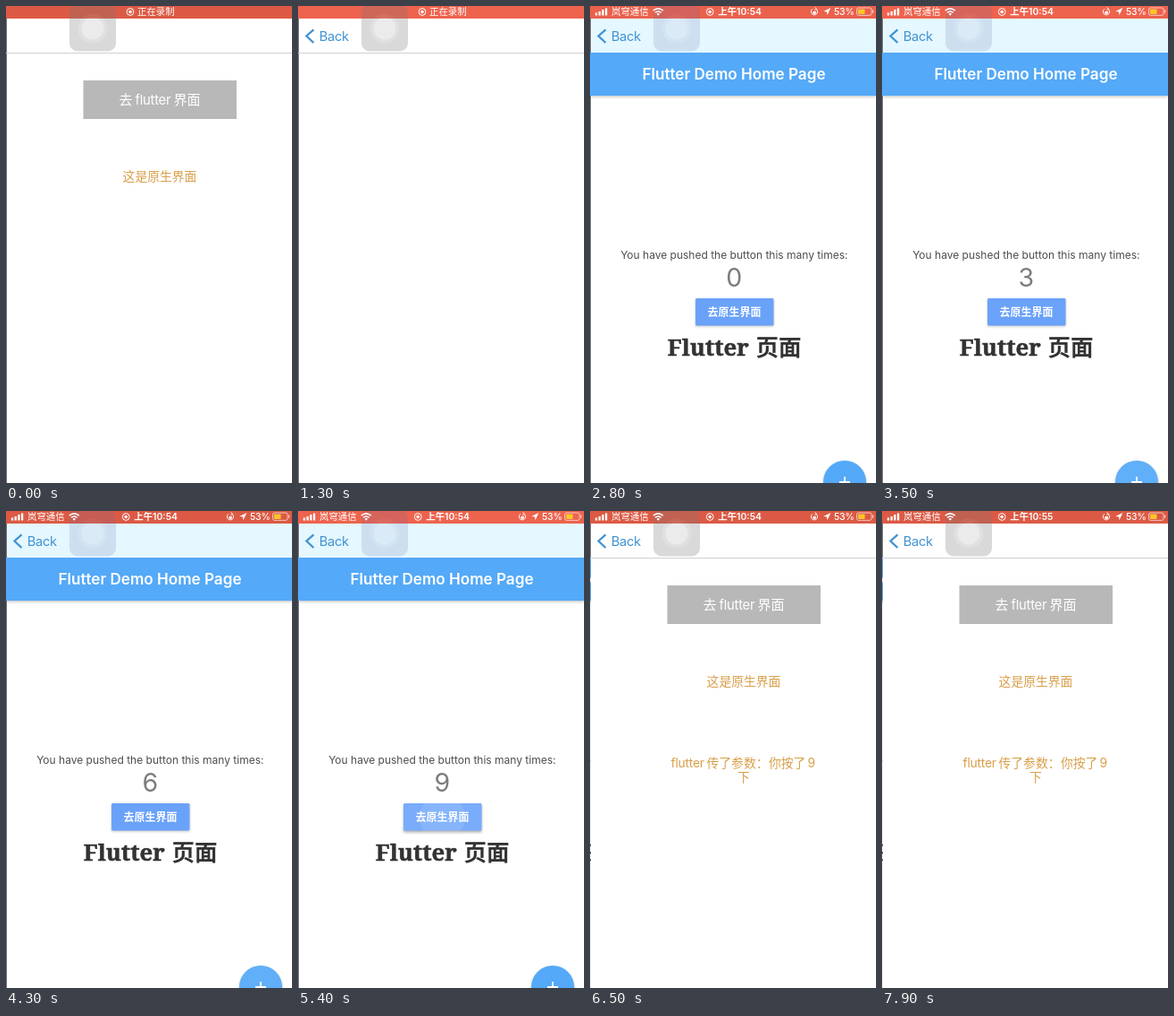
Recreate the animation shown at these times as an HTML page. Size 320 by 532 pixels, loop 8 s.

```html
<!DOCTYPE html>
<html lang="zh">
<head>
<meta charset="utf-8">
<title>Flutter 页面</title>
<style>
  html, body { margin: 0; width: 100%; height: 100%; overflow: hidden; background: #fff; }
  svg { display: block; width: 100vw; height: 100vh; }
  text { font-family: Inter, "Noto Sans CJK SC", "Noto Sans CJK", sans-serif; white-space: pre; }
  .mid { text-anchor: middle; }
  .heading { font-family: "Noto Serif", "Noto Sans CJK SC", "Noto Sans CJK", serif; font-weight: 700; }
  .cjk { font-family: "Noto Sans CJK SC", "Noto Sans CJK", sans-serif; }
  .latin { letter-spacing: -.25px; }
  .status text { font-size: 10.4px; font-weight: 500; fill: #fff; }
  .status .strong { font-weight: 600; }
</style>
</head>
<body>
<svg viewBox="0 0 320 532">
  <defs>
    <filter id="soft" x="-30%" y="-30%" width="160%" height="180%"><feGaussianBlur stdDeviation="1.5"/></filter>
    <clipPath id="fabClip"><circle cx="285" cy="531" r="24"/></clipPath>
    <clipPath id="btnClip"><rect x="118" y="326" width="87.5" height="30.5" rx="1.5"/></clipPath>
    <clipPath id="body"><rect y="52" width="320" height="480"/></clipPath>
  </defs>
  <rect width="320" height="532" fill="#fff"/>
  <path d="M.5 0V532" stroke="#6b6b6b"/>

  <g clip-path="url(#body)">
    <g id="flutter">
      <rect x="1" y="52" width="319" height="480" fill="#fff"/>
      <rect x="1" y="54" width="319" height="47.5" fill="#000" opacity=".22" filter="url(#soft)"/>
      <rect y="52" width="320" height="48" fill="#54a9f8"/>
      <text class="mid" x="161" y="82.4" font-size="17.1" font-weight="600" fill="#fff">Flutter Demo Home Page</text>
      <text class="mid" x="161.3" y="282.4" font-size="12" fill="#4d4d4d">You have pushed the button this many times:</text>
      <text id="count" class="mid" x="161.3" y="313" font-size="28.5" fill="#7c7c7c">0</text>
      <rect id="btnShadow" x="118" y="327" width="87.5" height="30.5" fill="#000" filter="url(#soft)"/>
      <rect x="118" y="326" width="87.5" height="30.5" rx="1.5" fill="#6aa2f9"/>
      <g clip-path="url(#btnClip)" fill="#fff">
        <rect id="btnTint" x="118" y="326" width="88" height="31"/>
        <circle id="btnRipple" cx="161.5" cy="342" r="0" opacity=".1"/>
      </g>
      <text class="cjk mid" x="161.5" y="346" font-size="12" font-weight="700" fill="#fff">去原生界面</text>
      <text class="heading" x="86.7" y="389.6" font-size="25.7" fill="#333" stroke="#333" stroke-width=".5">Flutter</text>
      <text class="cjk" x="185.5" y="389.5" font-size="25.5" font-weight="700" fill="#333">页面</text>
      <circle cx="285" cy="532.5" r="24" fill="#000" opacity=".25" filter="url(#soft)"/>
      <circle cx="285" cy="531" r="24" fill="#54a9f8"/>
      <circle id="fabRipple" cx="285" cy="531" r="0" fill="#fff" clip-path="url(#fabClip)"/>
      <path d="M279 531h12M285 525v12" stroke="#fff" stroke-width="1.8"/>
    </g>
    <rect id="dim" y="52" width="320" height="480" fill="#000" opacity="0"/>
    <g id="native">
      <rect x="1" y="52" width="319" height="480" fill="#fff"/>
      <rect x="86.5" y="83" width="171.5" height="43" fill="#b8b8b8"/>
      <g id="goTitle" fill="#fff" font-size="15">
        <text class="cjk" x="126.5" y="110">去</text>
        <text class="latin" x="144.5" y="110" font-size="14.8">flutter</text>
        <text class="cjk" x="187.5" y="110">界面</text>
      </g>
      <g fill="#d99f4a" font-size="13.8">
        <text class="cjk mid" x="172" y="195">这是原生界面</text>
        <g id="result">
          <text class="latin" x="90.5" y="286" font-size="13.9">flutter</text>
          <text class="cjk" x="130.5" y="286">传了参数：</text>
          <text class="cjk" x="200" y="286">你按了</text>
          <text x="243.5" y="286">9</text>
          <text class="cjk mid" x="172" y="302">下</text>
        </g>
      </g>
    </g>
  </g>

  <rect id="nav" x="1" y="14" width="319" height="38" fill="#e5f7ff"/>
  <rect id="navLine" y="52" width="320" height="1" fill="#d0d0d0"/>
  <g id="back">
    <path d="M17.5 26.3L9.5 33.5L17.5 41" fill="none" stroke="#4093d2" stroke-width="2.3"/>
    <text x="23.7" y="38.5" font-size="14.7" letter-spacing="-.3" fill="#4093d2">Back</text>
  </g>

  <rect id="bar" width="320" height="14"/>
  <g id="touch">
    <rect id="touchPad" x="71" y="-2" width="52" height="52.5" rx="9"/>
    <circle cx="97" cy="25" r="16.5" fill="#fff" opacity=".18"/>
    <circle cx="97" cy="25" r="12.5" fill="#fff" opacity=".35"/>
  </g>

  <g class="status">
    <g id="dot">
      <circle cx="139" cy="6.5" r="3.9" fill="none" stroke="#fff"/>
      <circle cx="139" cy="6.5" r="1.8" fill="#fff"/>
    </g>
    <text id="recording" x="147" y="10.3">正在录制</text>
    <text id="clock" class="strong" x="143.3" y="10.2"></text>
    <g id="details">
      <path d="M7 10.5v-3M10.7 10.5v-4.6M14.4 10.5v-6.4M18.1 10.5v-8" stroke="#fff" stroke-width="2.3"/>
      <text x="24" y="10.3">岚穹通信</text>
      <g fill="none" stroke="#fff" stroke-width="1.5">
        <path d="M70.8 5.2Q76.3 .6 81.8 5.2M73 7.4Q76.3 4.6 79.6 7.4"/>
        <path d="M252.8 3.2A3.6 3.6 0 1 1 249 3.3" stroke-width="1"/>
        <path d="M251.5 1.4L253.6 3.3L251.3 4.6" stroke-width=".9"/>
      </g>
      <path d="M74.5 8.8Q76.3 7.4 78.1 8.8L76.3 10.7ZM249.4 6h3.4v2.7h-3.4ZM269.3 2L261.3 6L265 6.5L265.5 10.2Z" fill="#fff"/>
      <text x="273" y="10.2" letter-spacing="-.2">53%</text>
      <rect x="298.5" y="2" width="16.5" height="8.4" rx="2" fill="none" stroke="#fff" stroke-opacity=".7" stroke-width=".9"/>
      <rect x="299.9" y="3.4" width="7.6" height="5.6" rx=".8" fill="#fac52c"/>
      <path d="M316.6 4.6v3.2" stroke="#fff" stroke-opacity=".7" stroke-width="1.2"/>
    </g>
  </g>
</svg>
<script>
const LOOP = 8000, OPEN = 1300, READY = 1600, PUSH = 5450, PUSH_MS = 400;
const TAP_START = 2850, TAP_GAP = 270, TAPS = 9, PRESS = 5230;
const $ = id => document.getElementById(id);
const clamp = v => Math.max(0, Math.min(1, v));
const ramp = (t, from, to) => clamp((t - from) / (to - from));
const mix = (a, b, k) => a + (b - a) * k;
const mixColor = (a, b, k) => `rgb(${a.map((v, i) => Math.round(mix(v, b[i], k)))})`;
const set = (id, attrs) => {
  for (const key in attrs) $(id).setAttribute(key, attrs[key]);
};
const show = (id, on) => set(id, { opacity: +on });

function drawBar(t) {
  const glow = clamp(.5 + .9 * Math.cos((t - 1200) / 2000 * 2 * Math.PI));
  set('bar', { fill: mixColor([220, 90, 69], [238, 99, 78], glow) });

  const swap = ramp(t, 1800, 1980);
  set('recording', { opacity: 1 - ramp(t, 1800, 2060) });
  set('clock', { opacity: swap });
  set('dot', { transform: `translate(${-4.8 * swap} 0)` });
  show('details', t >= 2100);
  $('clock').textContent = t < 6800 ? '上午10:54' : '上午10:55';
}

function drawRipples(t) {
  const since = t - TAP_START;
  const count = Math.max(0, Math.min(TAPS, Math.floor(since / TAP_GAP) + 1));
  $('count').textContent = count;
  const age = since - (count - 1) * TAP_GAP;
  const k = count ? clamp(age / 260) : 1;
  set('fabRipple', { r: 8 + 40 * k, opacity: .12 * (1 - k) });

  const press = ramp(t, PRESS, PRESS + 300);
  set('btnRipple', { r: 45 * press });
  set('btnTint', { opacity: .1 * Math.min(1, press * 3) });
  set('btnShadow', { opacity: press ? .3 : .22, y: press ? 328 : 327 });
}

function render(t) {
  const loaded = t >= READY;
  const pushing = t >= PUSH;
  const rest = pushing ? Math.pow(1 - ramp(t, PUSH, PUSH + PUSH_MS), 3.5) : 1;

  drawBar(t);
  drawRipples(t);
  show('flutter', loaded);
  show('native', t < OPEN || pushing);
  show('back', t >= OPEN);
  show('result', pushing);
  set('goTitle', { opacity: 1 - .4 * ramp(t, 600, 800) * (t < OPEN) });
  set('flutter', { transform: `translate(${-96 * (1 - rest)} 0)` });
  set('native', { transform: `translate(${pushing ? 320 * rest : 0} 0)` });
  set('dim', { opacity: pushing ? .1 * (1 - rest) : 0 });
  set('nav', { opacity: loaded ? rest : 0 });
  set('navLine', { opacity: loaded ? 1 - rest : 1 });
  const idle = ramp(t, READY, READY + 200) * (1 - ramp(t, PUSH, PUSH + 200));
  set('touch', { opacity: mix(.27, .17, idle) });
  set('touchPad', { fill: mixColor([119, 119, 119], [95, 108, 165], idle) });
}

const start = performance.now();
function tick() {
  render((performance.now() - start) % LOOP);
  requestAnimationFrame(tick);
}
tick();
</script>
</body>
</html>
```
